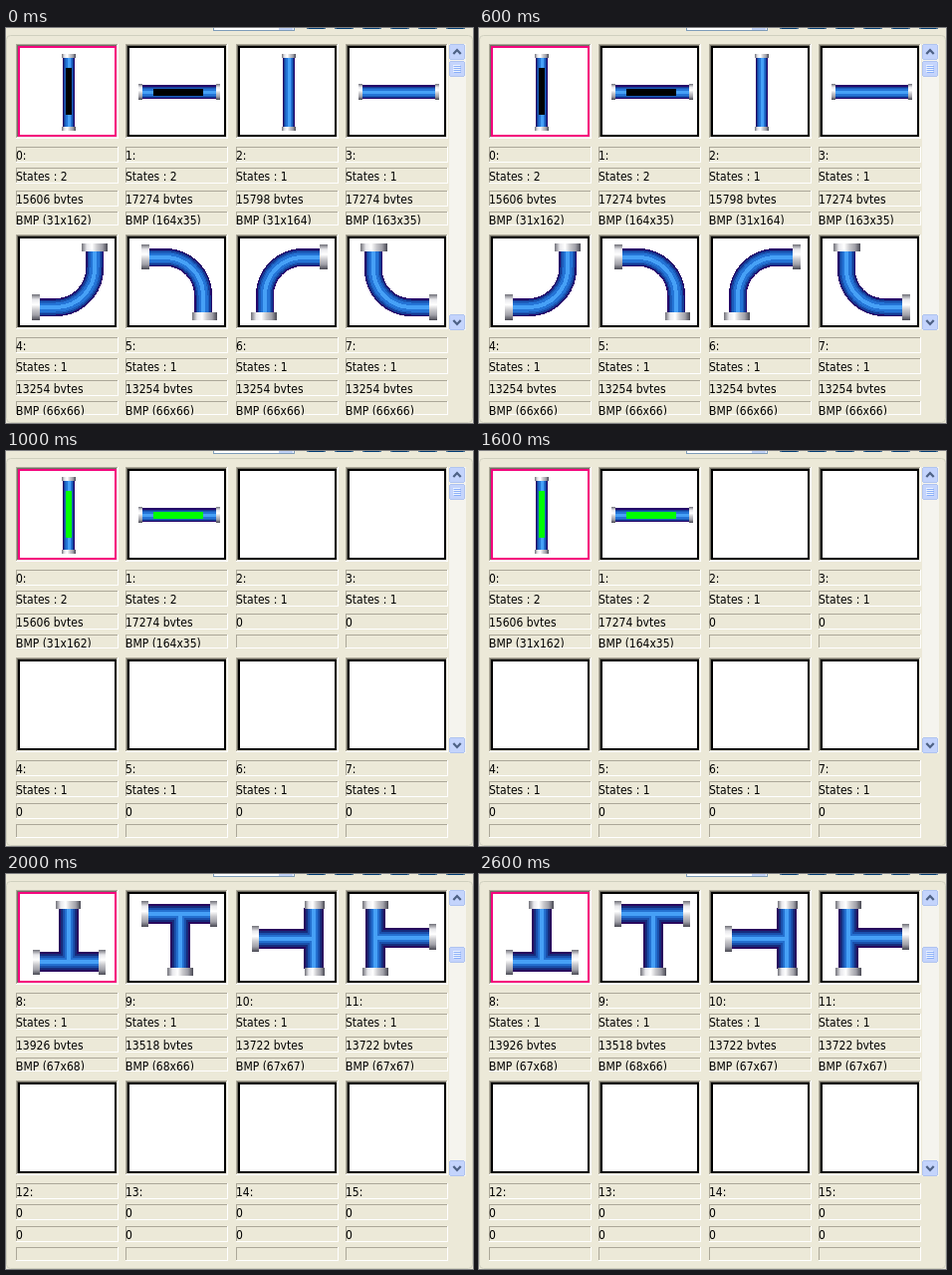
An HTML page for the animation above (3000 ms loop, 469 by 396 pixels).

```html
<!DOCTYPE html>
<html lang="en">
<head>
<meta charset="utf-8">
<style>
html, body { margin: 0; width: 100%; height: 100%; overflow: hidden; background: #ece9d8; }
svg { display: block; }
text { font: 12px "DejaVu Sans Condensed", "DejaVu Sans", sans-serif; font-stretch: condensed; fill: #000; }
path { fill: none; }
</style>
</head>
<body>
<svg id="stage" width="469" height="396" shape-rendering="crispEdges"></svg>
<script>
const COLUMNS = [10, 120, 231, 341];
const rect = (x, y, w, h, fill, extra = '') =>
  `<rect x="${x}" y="${y}" width="${w}" height="${h}" fill="${fill}" ${extra}/>`;
const line = (d, color, width = 1) => `<path d="${d}" stroke="${color}" stroke-width="${width}"/>`;
const sunken = (x, y, w, h, dark = '#aca899', light = '#fff') =>
  line(`M${x + .5} ${y + h}V${y + .5}H${x + w}`, dark) +
  line(`M${x} ${y + h - .5}H${x + w - .5}V${y}`, light);

// Pipes are nested strokes, from the dark rim to the bright core.
const shades = [[1, '#26046a'], [.82, '#143a94'], [.66, '#1c5cba'], [.48, '#2474d6'], [.22, '#46a0f6']];
const teeShades = [[1, '#28065e'], [.8, '#162c7c'], [.6, '#1a50ac'], [.42, '#2470d0'], [.2, '#46a0f6']];
const pipe = (d, width = 18, tones = shades) =>
  tones.map(([k, color]) => line(d, color, Math.round(width * k))).join('');
const cap = (x, y, w, h) => rect(x, y, w, h, `url(#${w > h ? 'across' : 'down'})`);

function straight(x, y, w, h, slot) {
  const tall = h > w;
  const d = tall ? `M${x + w / 2} ${y + 3}v${h - 6}` : `M${x + 3} ${y + h / 2}h${w - 6}`;
  const ends = tall
    ? cap(x - 1, y, w + 2, 4) + cap(x - 1, y + h - 4, w + 2, 4)
    : cap(x, y - 1, 4, h + 2) + cap(x + w - 4, y - 1, 4, h + 2);
  const gap = !slot ? '' : tall ? rect(x + 3, y + 14, 6, 47, slot) : rect(x + 15, y + 4, 50, 7, slot);
  return pipe(d, tall ? w : h) + ends + gap;
}
const gauges = slot => straight(57, 26, 12, 77, slot) + straight(133, 57, 82, 14, slot);

const elbows =
  pipe('M33 280H50A39 39 0 0 0 89 240V223') + cap(76, 216, 26, 8) + cap(26, 267, 8, 26) +
  pipe('M143 230H160A38 38 0 0 1 198 268V286') + cap(136, 217, 8, 25) + cap(187, 285, 25, 8) +
  pipe('M316 230H298A38 38 0 0 0 260 268V286') + cap(315, 217, 8, 25) + cap(246, 285, 26, 8) +
  pipe('M369 223V242A38 38 0 0 0 407 280H426') + cap(356, 216, 27, 8) + cap(425, 267, 8, 26);

const tee = d => pipe(d, 20, teeShades);
const tees =
  tee('M34 88H93M63 34V88') + cap(50, 27, 25, 8) + cap(27, 76, 7, 25) + cap(93, 76, 7, 25) +
  tee('M143 40H206M175 40V95') + cap(136, 27, 7, 26) + cap(205, 27, 7, 26) + cap(162, 94, 26, 8) +
  tee('M309 34V95M254 65H309') + cap(300, 27, 20, 8) + cap(300, 94, 20, 8) + cap(247, 52, 7, 26) +
  tee('M371 34V95M371 64H426') + cap(358, 27, 26, 8) + cap(358, 94, 26, 8) + cap(425, 50, 7, 26);

// Descenders are cut off at the bottom of each label.
function label(x, y, h, baseline, text) {
  return sunken(x, y, 103, h) +
    `<svg x="${x}" y="${y + 1}" width="102" height="${baseline - y - 1}">` +
    `<text y="${baseline - y - 1}">${text}</text></svg>`;
}

function cell(i, first, info) {
  const x = COLUMNS[i % 4], low = i > 3, y = low ? 207 : 16;
  const texts = [`${first + i}:`, ...info];
  const tops = low ? [310, 331, 353, 374] : [119, 140, 163, 184];
  const bases = low ? [323, 344, 366, 388] : [132, 153, 176, 197];
  return sunken(x, y, 103, 95) + sunken(x + 1, y + 1, 101, 93, '#716f64', '#f1efe2') +
    rect(x + 3, y + 3, 97, 89, '#fff', `stroke="${i ? '#000' : '#f5057e'}" stroke-width="2"`) +
    texts.map((t, k) => label(x, tops[k], k === 3 ? 14 : 16, bases[k], t)).join('');
}

function scrollButton(y, glyph) {
  return rect(445.5, y + .5, 15, 15, '#c4d4fc', 'rx="2" stroke="#b0c4f0"') +
    `<g shape-rendering="auto">${glyph}</g>`;
}
const chevron = (y, dy) => line(`M449.3 ${y}l3.7 ${dy}l3.7 ${-dy}`, '#4d6185', 2.2);
const grip = y => [4, 6, 8, 10].map(k =>
  line(`M449 ${y + k + .5}h7`, '#eef4fe') + line(`M450 ${y + k + 1.5}h7`, '#8cb0f8')).join('');

const page = (first, infos, art, thumb) =>
  infos.map((info, i) => cell(i, first, info)).join('') + art + scrollButton(thumb, grip(thumb));

const loaded = (bytes, size, states = 1) => [`States : ${states}`, `${bytes} bytes`, `BMP (${size})`];
const pending = ['States : 1', '0', ''], empty = ['0', '0', ''];
const gaugeInfo = [loaded(15606, '31x162', 2), loaded(17274, '164x35', 2)];
const pages = [
  page(0, [...gaugeInfo, loaded(15798, '31x164'), loaded(17274, '163x35'),
    ...Array(4).fill(loaded(13254, '66x66'))],
    gauges('#000') + straight(278, 26, 12, 77) + straight(354, 57, 81, 14) + elbows, 33),
  page(0, [...gaugeInfo, ...Array(6).fill(pending)], gauges('#0f0'), 33),
  page(8, [loaded(13926, '67x68'), loaded(13518, '68x66'), loaded(13722, '67x67'),
    loaded(13722, '67x67'), ...Array(4).fill(empty)], tees, 73)
];

const metal = (id, direction) => `<linearGradient id="${id}" ${direction}>` +
  ['#707078', '#e8e8ec', '#fff', '#c8c8cc', '#a0a0a8', '#484852']
    .map((color, i) => `<stop offset="${i / 5}" stop-color="${color}"/>`).join('') + '</linearGradient>';

const stage = document.getElementById('stage');
stage.innerHTML = `<defs>${metal('across', '')}${metal('down', 'x2="0" y2="1"')}</defs>` +
  rect(0, 0, 469, 396, '#ece9d8') +
  rect(.5, 7.5, 468, 388, 'none', 'rx="4" stroke="#d0d0bf" shape-rendering="auto"') +
  rect(208.5, -5.5, 81, 8, '#fff', 'stroke="#7f9db9"') + rect(274, 0, 14, 2, '#c1d2f6') +
  [0, 1, 2, 3, 4, 5].map(i =>
    rect(301.5 + 28 * i, -9.5, 20, 10, '#f3f2ec', 'rx="2" stroke="#003c74" shape-rendering="auto"')).join('') +
  rect(445, 16, 17, 287, '#f5f4ee') +
  scrollButton(16, chevron(26, -4)) + scrollButton(287, chevron(293, 4)) +
  pages.map(p => `<g class="page">${p}</g>`).join('');

const groups = stage.querySelectorAll('.page');
function draw() {
  const current = Math.floor(performance.now() / 1000) % 3;
  groups.forEach((g, i) => g.setAttribute('display', i === current ? 'inline' : 'none'));
  requestAnimationFrame(draw);
}
draw();
</script>
</body>
</html>
```
